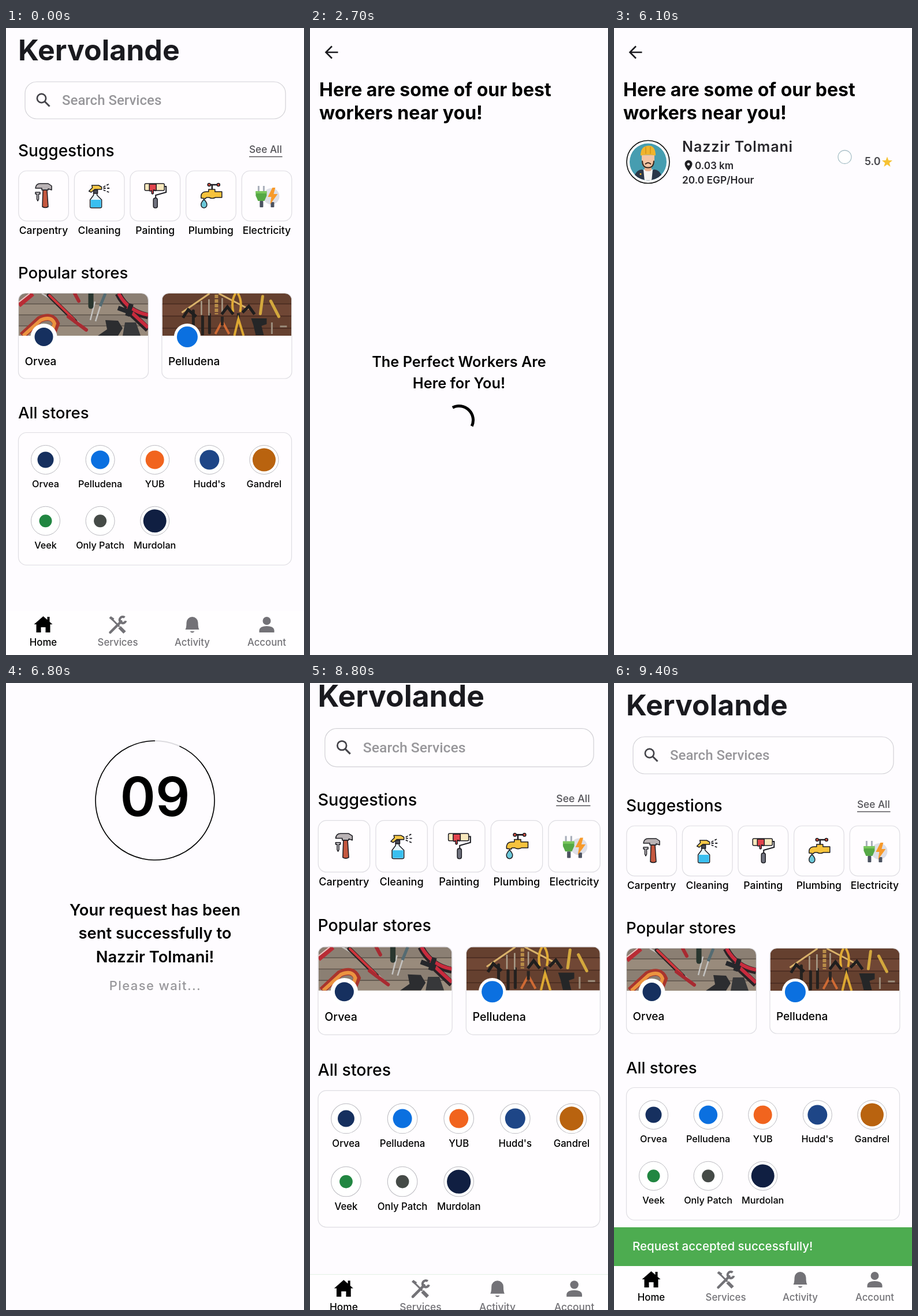
Animation, 516 px wide and 1084 px high, one loop 10000 ms. Source, as an HTML page:

```html
<!DOCTYPE html>
<html lang="en">
<head>
<meta charset="utf-8">
<title>Home services app</title>
<style>
html, body { margin: 0; width: 100%; height: 100%; overflow: hidden; background: #fefcff; }
svg { display: block; width: 100%; height: 100%; font-family: Inter, Roboto, sans-serif; }
</style>
</head>
<body>
<svg id="stage" viewBox="0 0 516 1084"></svg>
<script>
const $ = id => document.getElementById(id);
const clamp = v => Math.min(1, Math.max(0, v));

// ---- drawing helpers ----
const text = (x, y, size, weight, str, more = '') =>
  `<text x="${x}" y="${y}" font-size="${size}" font-weight="${weight}" ${more}>${str}</text>`;
const mid = (x, y, size, weight, str, more = '') =>
  text(x, y, size, weight, str, 'text-anchor="middle" ' + more);
const box = (x, y, w, h, r, fill, more = '') =>
  `<rect x="${x}" y="${y}" width="${w}" height="${h}" rx="${r}" fill="${fill}" ${more}/>`;
const dot = (x, y, r, fill, more = '') =>
  `<circle cx="${x}" cy="${y}" r="${r}" fill="${fill}" ${more}/>`;
const path = (d, fill, more = '') => `<path d="${d}" fill="${fill}" ${more}/>`;
const line = (d, color, w, more = '') =>
  path(d, 'none', `stroke="${color}" stroke-width="${w}" ${more}`);
const at = (x, y, body, more = '') => `<g transform="translate(${x} ${y})" ${more}>${body}</g>`;
const edge = 'stroke="#dedde2" stroke-width="1.2"';
const ink = 'stroke="#1c1c22" stroke-width="1.5" stroke-linejoin="round"';
const round = 'stroke-linecap="round"';
const paper = box(-60, -120, 636, 1324, 0, '#fefcff');

function arc(cx, cy, r, from, sweep) {
  const p = a => `${cx + r * Math.cos(a)} ${cy + r * Math.sin(a)}`;
  return `M${p(from)}A${r} ${r} 0 ${sweep > Math.PI ? 1 : 0} 1 ${p(from + sweep)}`;
}

// ---- service icons, centred on 0,0 ----
const services = {
  Carpentry:
    path('M-1-10H6L8 19Q3 22-2 19Z', '#c4583f', ink) +
    path('M-14-13Q-13-21-6-21H8L14-17V-10L8-12V-10H-3V-13H-9Z', '#b9b3b5', ink) +
    path('M-14-6H-6V-3H-8.500V6L-10 9-11.500 6V-3H-14Z', '#d9d5d8', ink),
  Cleaning:
    path('M-10-5H-4V-1L4 7V19Q4 21 1 21H-13Q-16 21-16 19V7L-10-1Z', '#e8f7fc', ink) +
    path('M-15 7H3V20H-15Z', '#39bff0') +
    path('M-10-10H-3V-4H-10Z', '#4a4d57', ink) +
    path('M-13-18H-1L4-15V-11H-8L-14-6-18-8-12-14Z', '#f7c948', ink) +
    line('M7-15 18-21M7-13H20M7-10 19-5', '#1c1c22', 1.8, 'stroke-dasharray="4 2.500"'),
  Painting:
    line('M16-16H19V-6L1-1V6', '#1c1c22', 2) +
    box(-18, -21, 34, 12, 2, '#f8e8bd', ink) +
    path('M-10-20H2V-10Q0-7-1-10H-3V-4Q-5-2-6-4V-9Q-10-6-10-11Z', '#e2444c', ink) +
    box(-3, 4, 7, 17, 3, '#70727e', ink),
  Plumbing:
    path('M-17 4V0Q-16-7-8-7H-4V-11H7V-7H19V3H8Q2 6-3 3H-7Q-9 3-9 5Z', '#f6c33d', ink) +
    line('M2-11V-19M-6-19H12', '#1c1c22', 2.5) +
    dot(-3, -19, 2.5, '#e2503f', ink) + dot(13, -19, 2.5, '#e2503f', ink) +
    path('M-12 6Q-18 13-17 16A5 5 0 0 0-7 16Q-6 13-12 6Z', '#6cc7d8', ink),
  Electricity:
    dot(8, 1, 14, '#dedfe7') +
    line('M-14-8V-17M-5-8V-17', '#a9afba', 3) +
    path('M-19-8H0V0L-4 9H-15L-19 0Z', '#55a845') + path('M-19-8H0V-4H-19Z', '#79c75d') +
    box(-12, 9, 6, 11, 1, '#4c5361') + box(7, 11, 6, 9, 1, '#4c5361') +
    path('M10-14 2 2H8L6 15 19-3H12L15-14Z', '#f79a2b')
};

// ---- photos of tools, 224 x 73, as flat shapes ----
const photos = [
  box(0, 0, 224, 73, 0, '#8b7f73') +
  path('M0 19H224V37H0ZM0 56H224V73H0Z', '#998b7c') +
  line('M0 18H224M0 37H224M0 56H224', '#5f554c', 1.5) +
  line('M0 20 24 0', '#b92c35', 9) + line('M0 15 19 0', '#e5c9c4', 2) +
  line('M40 0 62 13M98 45 112 58M132 14 124 46M145 10 133 48', '#c4c3c1', 2.5) +
  line('M52 3 98 48', '#2d2527', 7, round) + line('M53 3 96 45', '#d0353b', 4, round) +
  line('M97 0 104 13M86 40 117 63', '#a82a31', 6, round) +
  line('M125 0V22', '#29362f', 9, round) + line('M150 0 141 22', '#546b72', 5) +
  line('M6 73 36 45Q58 35 65 52L57 73', '#a9352d', 12) +
  line('M8 73 38 46Q57 38 62 52L55 73', '#eb9440', 6) +
  line('M172 0Q188 32 224 39M185 25 224 62', '#2a2226', 11) +
  line('M173 0Q190 31 224 37M187 25 224 59', '#c92b3d', 6) +
  line('M172 25 197 34M195 18 188 39', '#25272b', 8) +
  path('M150 46 172 47 180 60 172 73H137L153 62Z', '#2c2d30') +
  path('M184 50 203 50 211 73H180Z', '#37383a'),
  box(0, 0, 224, 73, 0, '#65402f') +
  path('M0 18H224V39H0Z', '#704735') +
  line('M0 18H224M0 39H224M0 60H224', '#472a1f', 1.5) +
  line('M34 33 82 0M98 0 150 27', '#d9b26a', 3) +
  line('M94 2V36', '#b88c48', 6, 'stroke-dasharray="6 2"') +
  line('M54 30V70M70 40V70M82 36V68', '#24211f', 5, round) +
  line('M68 13V37M81 10V38M104 8V32', '#a99c89', 2.5) +
  line('M123 32Q119 12 127 0M135 32Q139 12 131 0', '#e0aa35', 4) +
  line('M36 42 45 28 59 40M103 36 113 23 123 36M139 33 150 22 160 36', '#1f1e1e', 5) +
  line('M92 70 104 48 116 70', '#cf6a34', 4) + line('M104 40V55M132 34V48', '#292523', 5) +
  line('M125 73 132 44 141 73', '#dda832', 4) +
  line('M174 5 170 35M188 13 202 40', '#d3a83d', 5, round) +
  path('M154 43H181V53L172 56 176 72H162L158 55Z', '#252627') +
  line('M190 50V70M204 57H216', '#9c8e7d', 3)
];

const stores = [
  ['Orvea', '#16305f', 14], ['Pelludena', '#0b70e0', 16], ['YUB', '#f1641e', 16],
  ["Hudd's", '#1e4687', 17], ['Gandrel', '#b9630f', 20], ['Veek', '#218641', 11],
  ['Only Patch', '#454b47', 11], ['Murdolan', '#101f42', 20]
];

// ---- home ----
const tiles = Object.entries(services).map(([name, icon], i) => {
  const x = 65 + 96.6 * i;
  return box(x - 43.2, 247, 86.6, 86.6, 14, '#fffdff', edge) + at(x, 290, icon) +
    mid(x, 356, 17.5, 500, name);
}).join('');

const cards = photos.map((photo, i) => {
  const x = 22 + 248.4 * i, [name, color, r] = stores[i];
  return box(x, 459, 224, 147, 12, '#fffdff') +
    at(x, 459, photo, 'clip-path="url(#top)"') +
    box(x - .5, 458.5, 225, 147.5, 12, 'none', edge) +
    dot(x + 43.5, 534, 23, '#fff') + dot(x + 43.5, 534, r + 2, color) +
    text(x + 10.5, 583, 19, 500, name);
}).join('');

const shops = stores.map(([name, color, r], i) => {
  const x = 68.5 + 94.6 * (i % 5), y = i < 5 ? 746.5 : 852.2;
  return dot(x, y, 25, '#fff', 'stroke="#bbbac0"') + dot(x, y, r, color) +
    mid(x, y + 47.3, 16.2, 500, name);
}).join('');

const grey = '#737277';
const nav = [
  ['Home', path('M0-15 16-1H12V13H4V4H-4V13H-12V-1H-16ZM7-14H11V-4H7Z', '#000')],
  ['Services',
    line('M-10-10 3 3', grey, 3) + path('M-15-12-12-15-6-11-9-7Z', grey) +
    line('M3 4 12 13', grey, 6) + line('M-13 13 6-6', grey, 4.5, round) +
    line('M12-13A5.5 5.5 0 1 0 14-7', grey, 4)],
  ['Activity', path('M-12 8Q-10 5-10-4A10 10 0 0 1 10-4Q10 5 12 8ZM-4 11H4Q0 16-4 11Z', grey)],
  ['Account', dot(0, -7, 7, grey) + path('M-13 13V9Q-12 2 0 2T13 9V13Z', grey)]
].map(([name, icon], i) => at(64.5 + 129 * i, 1032, icon +
  mid(0, 36, 16.8, 500, name, `fill="${i ? grey : '#000'}"`))).join('');

const home = paper +
  text(21, 56, 50, 700, 'Kervolande', 'fill="#1a1a1f"') +
  box(33, 93, 451, 64, 20, '#fffdff', 'stroke="#d2d1d6" stroke-width="1.2"') +
  dot(61.5, 121.5, 7.6, 'none', 'stroke="#45444a" stroke-width="2.700"') +
  line('M67 127 75.500 135.500', '#45444a', 3) +
  text(97, 133, 24, 500, 'Search Services', 'fill="#98979b" font-family="Roboto, sans-serif"') +
  text(21, 222, 28, 500, 'Suggestions') +
  text(421, 216, 17.2, 500, 'See All', 'fill="#555459"') +
  line('M421 222.500H478.500', '#555459', 1.4) + tiles +
  text(21, 432.5, 27.6, 500, 'Popular stores') + cards +
  text(21, 674.5, 27.6, 500, 'All stores') +
  box(21.5, 699.5, 473, 229, 14, '#fffdff', edge) + shops +
  `<g id="snack">${box(-60, 941, 636, 80, 0, '#4dac50') +
    text(32, 980.5, 20.5, 500, 'Request accepted successfully!', 'fill="#fff"')}</g>` +
  box(-60, 1004, 636, 4, 0, '#f9f7fa', 'id="shade"') +
  box(-60, 1008, 636, 160, 0, '#fffeff') + nav;

// ---- worker list ----
const avatar =
  dot(59, 231.5, 37, '#fff', 'stroke="#111" stroke-width="1.600"') +
  at(59, 231.5, dot(0, 0, 32, '#469db0') +
    `<g clip-path="url(#face)">${
      path('M-24 34Q-25 15-11 13L0 18 11 13Q25 15 24 34Z', '#2b3849') +
      path('M-8 13H8L6 34H-6Z', '#f5f4f2') +
      box(-6, 5, 12, 11, 4, '#eab08c') +
      path('M-11-12H11V-1Q10 10 0 11T-11-1Z', '#f5c4a2') +
      line('M-10-2Q-10 10 0 10T10-2M-5 4Q0-1 5 4', '#39291f', 2) +
      path('M-13-11Q-13-27 0-28T13-11Q0-14-13-11Z', '#f0b42c') +
      line('M-4-14V-26M4-14V-26', '#d89a1f', 2) + dot(-13, 21, 1.5, '#f0b42c')
    }</g>`);
const star = Array.from({ length: 10 }, (_, i) => {
  const r = i % 2 ? 4 : 9.5, a = i * Math.PI / 5;
  return `${473 + r * Math.sin(a)},${232 - r * Math.cos(a)}`;
}).join(' ');

const list = paper +
  line('M48.500 42H28M38 31.500 27.500 42 38 52.500', '#1b1b1f', 2.6) +
  text(16, 117.5, 32, 700, 'Here are some of our best') +
  text(16, 158, 32, 700, 'workers near you!') +
  `<g id="loading">${
    mid(258, 585.5, 25.3, 600, 'The Perfect Workers Are') +
    mid(258, 623, 25.3, 600, 'Here for You!') +
    line('', '#000', 5, 'id="spinner"')
  }</g><g id="worker" fill="#28272c">${
    `<g id="avatar">${avatar}</g>` +
    text(118, 214, 25, 600, 'Nazzir Tolmani', 'letter-spacing=".9"') +
    path('M129 247Q122 239 122.500 235A6.500 6.500 0 0 1 135.500 235Q136 239 129 247Z', '#1f1f23') +
    dot(129, 235.5, 2.3, '#fff') +
    text(140, 243.5, 17, 600, '0.03 km') +
    text(118, 269, 17.3, 600, '20.0 EGP/Hour') +
    text(434, 237, 18, 600, '5.0', 'fill="#48474c"') +
    `<polygon points="${star}" fill="#f6c233"/>`
  }</g>`;

// ---- countdown ----
const wait = paper +
  dot(258, 203, 103, 'none', 'stroke="#dcdbdf" stroke-width="2"') +
  line('', '#000', 1.6, 'id="ring"') +
  mid(258, 230, 93, 600, '', 'id="count"') +
  mid(258, 402, 27.3, 600, 'Your request has been') +
  mid(258, 442, 27.3, 600, 'sent successfully to') +
  mid(258, 482.5, 27.3, 600, 'Nazzir Tolmani!') +
  mid(258.5, 531, 22, 500, 'Please wait...', 'fill="#98979b" letter-spacing="1.400"');

$('stage').innerHTML = `<defs>
  <clipPath id="top"><path d="M0 73V12Q0 0 12 0H212Q224 0 224 12V73Z"/></clipPath>
  <clipPath id="face"><circle r="32"/></clipPath></defs>
  <g id="home">${home}</g><g id="list">${list}</g><g id="wait">${wait}</g>
  ${dot(0, 0, 11.5, '#fff', 'id="touch" stroke="#a9c0c8" stroke-width="1.300"')}`;

// ---- easing ----
function bezier(x1, y1, x2, y2) {
  const f = (a, b, s) => 3 * a * s * (1 - s) ** 2 + 3 * b * s * s * (1 - s) + s ** 3;
  return x => {
    let lo = 0, hi = 1;
    for (let i = 0; i < 24; i++) {
      const m = (lo + hi) / 2;
      if (f(x1, x2, m) < x) lo = m; else hi = m;
    }
    return f(y1, y2, hi);
  };
}
const ease = bezier(.4, 0, .2, 1);
const zoomA = bezier(.05, 0, .1333, .06), zoomB = bezier(.2083, .82, .25, 1);
const zoom = p => p < 1 / 6 ? .4 * zoomA(p * 6) : .4 + .6 * zoomB((p - 1 / 6) * 1.2);

// ---- timeline, ms ----
const OPEN = 2050, FOUND = 3500, BOOK = 6150, CLOSE = 8718, SNACK = 8950;
const TURN = 2 * Math.PI;

function show(id, on) { $(id).setAttribute('display', on ? 'inline' : 'none'); }
function pose(id, scale, opacity) {
  show(id, opacity > 0);
  $(id).setAttribute('opacity', opacity);
  $(id).setAttribute('transform', `translate(258 542) scale(${scale}) translate(-258 -542)`);
}

function render(t) {
  const [open, book, close] = [OPEN, BOOK, CLOSE].map(s => clamp((t - s) / 300));
  const fadeIn = p => clamp((p - .125) / .125);
  const back = t >= CLOSE;

  pose('home', back ? 1.1 - .1 * zoom(close) : 1 + .05 * zoom(open), back || open < 1 ? 1 : 0);
  pose('list', book ? 1 + .05 * zoom(book) : .85 + .15 * zoom(open), book < 1 ? fadeIn(open) : 0);
  pose('wait', back ? 1 - .1 * zoom(close) : .85 + .15 * zoom(book),
    fadeIn(book) * (1 - clamp((close - .0825) / .125)));

  // loading arc: head and tail chase each other while the whole arc turns
  show('loading', t < FOUND);
  show('worker', t >= FOUND);
  show('avatar', t >= FOUND + 100);
  const spin = Math.max(0, t - 1807), cycle = spin % 1333 / 1333;
  const head = ease(clamp(cycle * 2)), tail = ease(clamp(cycle * 2 - 1));
  $('spinner').setAttribute('d', arc(258, 678, 24.5,
    TURN * (-.25 + .75 * tail + spin / 2222 + cycle / 4), Math.max(.01, TURN * .75 * (head - tail))));

  const gone = Math.max(.01, (t - 6125) / 1000);
  $('ring').setAttribute('d', arc(258, 203, 103, TURN * (gone / 10 - .25), TURN * (1 - gone / 10)));
  $('count').textContent = String(Math.floor(10 - gone)).padStart(2, '0');

  const rise = ease(clamp((t - SNACK) / 250));
  show('snack', rise > 0);
  show('shade', rise === 0);
  $('snack').setAttribute('transform', `translate(0 ${67 * (1 - rise)})`);

  const first = t >= 1700 && t < 1900, second = t >= 6100 && t < 6200;
  show('touch', first || second);
  const drift = (t - 1700) / 100;
  $('touch').setAttribute('transform',
    first ? `translate(${361.5 - 8 * drift} ${303 - 4 * drift})` : 'translate(399.5 223)');
}

// the screen refreshes ten times a second
const start = performance.now();
function tick() {
  const t = (performance.now() - start) % 10000;
  render(Math.floor(t / 100) * 100);
  requestAnimationFrame(tick);
}
tick();
</script>
</body>
</html>
```
